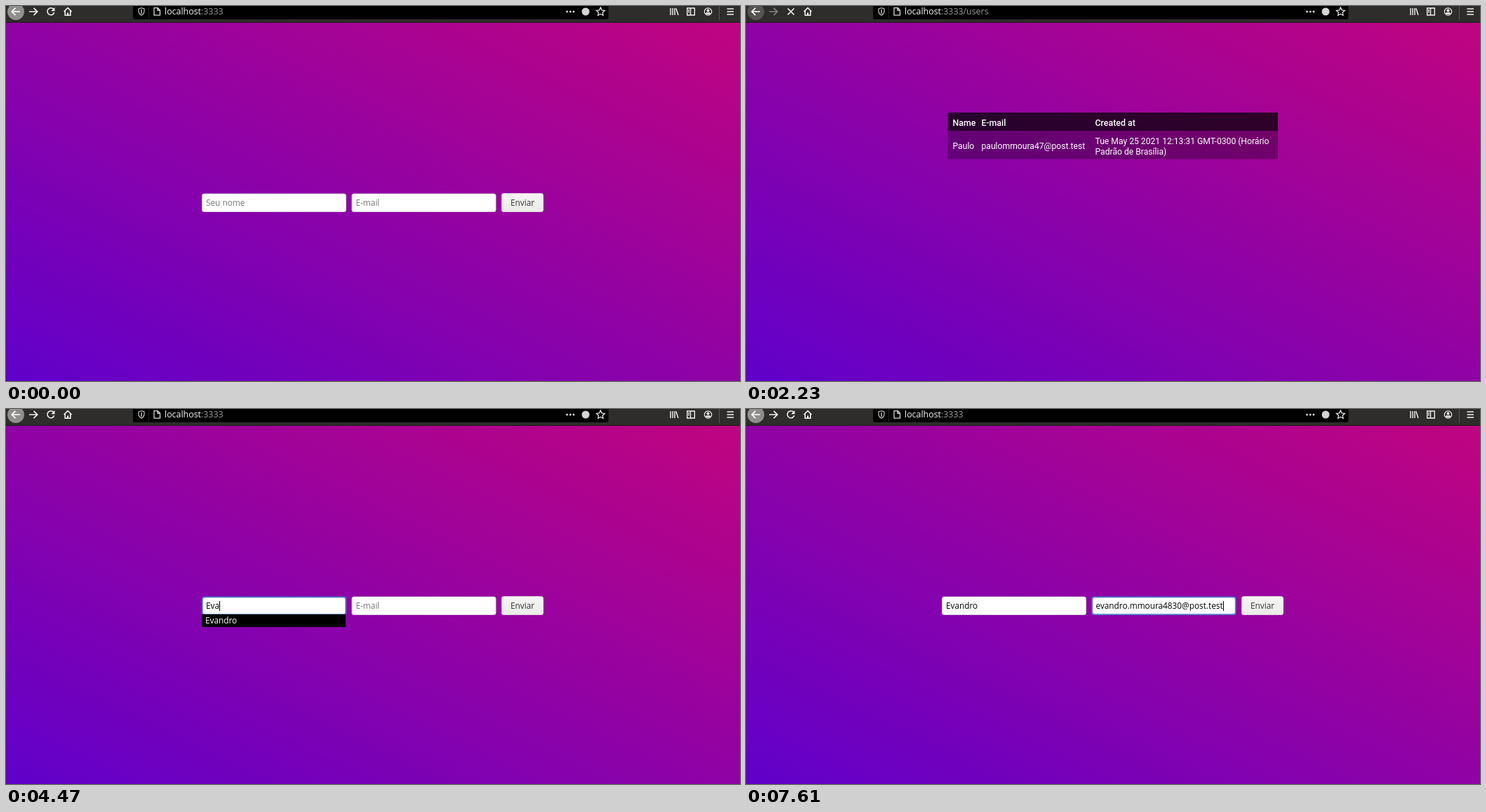
Recreate the animation shown at these times as an HTML page with a canvas. Size 1046 px wide and 535 px high, loop 8000 ms.

```html
<!DOCTYPE html>
<html lang="pt-BR">
<head>
<meta charset="utf-8">
<title>Cadastro</title>
<style>
  html, body { margin: 0; width: 100%; height: 100%; overflow: hidden; background: #9000a4; }
  canvas { display: block; width: 1046px; height: 535px; }
</style>
</head>
<body>
<canvas id="stage" width="1046" height="535"></canvas>
<script>
const W = 1046, H = 535, BAR = 24, LOOP = 8000;
const ctx = document.getElementById('stage').getContext('2d');
const UI = '"Open Sans", "Noto Sans", sans-serif';
const FIELD = '11.8px ' + UI;
const ICON = '#f2f2f0';
const NAME = 'Evandro';
const MAIL = 'evandro.mmoura4830@post.test';

// Value of the last [time, value] step reached.
const at = (t, steps) => steps.reduce((v, s) => t >= s[0] ? s[1] : v, steps[0][1]);
const within = (t, a, b) => t >= a && t < b;

function text(str, x, y, font, color) {
  ctx.font = font;
  ctx.fillStyle = color;
  ctx.fillText(str, x, y);
  return x + ctx.measureText(str).width;
}

function rect(x, y, w, h, color) {
  ctx.fillStyle = color;
  ctx.fillRect(x, y, w, h);
}

function round(x, y, w, h, r, fill) {
  ctx.beginPath();
  ctx.roundRect(x, y, w, h, r);
  ctx.fillStyle = fill;
  ctx.fill();
}

function disc(x, y, r, color) {
  ctx.beginPath();
  ctx.arc(x, y, r, 0, Math.PI * 2);
  ctx.fillStyle = color;
  ctx.fill();
}

function path(d, color = ICON, width = 1.5) {
  ctx.strokeStyle = color;
  ctx.lineWidth = width;
  ctx.stroke(new Path2D(d));
}

function background() {
  const h = H - BAR, k = W * h / (W * W + h * h);
  const cx = W / 2, cy = BAR + h / 2;
  const g = ctx.createLinearGradient(cx - h * k, cy + W * k, cx + h * k, cy - W * k);
  g.addColorStop(0, '#6000ca');
  g.addColorStop(1, '#c00480');
  rect(0, BAR, W, h, g);
}

function star(x, y, r) {
  let d = '';
  for (let i = 0; i < 10; i++) {
    const a = i * Math.PI / 5 - Math.PI / 2, q = i % 2 ? r * 0.48 : r;
    d += (i ? 'L' : 'M') + (x + q * Math.cos(a)) + ' ' + (y + q * Math.sin(a));
  }
  path(d + 'Z', ICON, 1.2);
}

function toolbar(t) {
  rect(0, 0, W, BAR, '#2e2d2b');
  rect(0, BAR - 1, W, 1, '#1d1b1c');

  disc(14, 8, 12, within(t, 2230, 2430) ? '#555452' : '#908f8d');
  path('M20 8H8.5M13.5 2.8L8.3 8L13.5 13.2', '#fff', 1.7);

  const hover = at(t, [[0, 0], [500, 0.12], [610, 0.25], [1020, 0]]);
  if (hover) disc(39, 8, 12, `rgba(255,255,255,${hover})`);
  path('M33 8H44.5M39.5 2.8L44.7 8L39.5 13.2', within(t, 1020, 2360) ? '#858482' : ICON, 1.7);

  if (within(t, 610, 1020) || within(t, 2230, 2330)) {
    path('M59.5 3.5L68.5 12.5M68.5 3.5L59.5 12.5', ICON, 1.7);
  } else {
    path('M67.8 4.6A5 5 0 1 0 68.7 9.3', ICON, 1.6);
    ctx.fillStyle = ICON;
    ctx.fill(new Path2D('M69.5 2V7.2H64.3Z'));
  }
  path('M82.5 8L88 2.6L93.5 8M84.2 7V13.2H91.8V7', ICON, 1.6);
  path('M88 13V9.5', ICON, 2.2);

  round(181, -6, 677.5, 25, 3, '#000');
  path('M193 2.8L197 4V7C197 10 195.3 12 193 13.2C190.7 12 189 10 189 7V4Z', '#c9c9c9', 1.2);
  path('M193 5V11', '#c9c9c9', 1.4);
  path('M203.5 0V18', '#252525', 1);
  path('M211 2.7H216.3L219.5 6V13.2H211ZM216 3V6.3H219.3', '#d5d5d5', 1.3);

  const users = within(t, 850, 2360);
  const x = text('localhost', 226, 12, '12.4px ' + UI, '#f9f9fa');
  text(users ? ':3333/users' : ':3333', x, 12, '12.4px ' + UI, '#9b9b9d');

  for (let i = 0; i < 3; i++) disc(799.5 + i * 4.7, 8, 1.5, '#d5d5d5');
  disc(826, 8, 5.5, '#d5d5d5');
  star(847.3, 8.3, 6.3);

  path('M947 3V13M950 3V13M953 3V13M954.8 3.2L958 13', ICON, 1.4);
  path('M970.7 3H981.3V13H970.7ZM975.5 3V13M972 6H974M972 8.5H974', ICON, 1.4);
  path('M995.3 8A5.2 5.2 0 1 1 1005.7 8A5.2 5.2 0 1 1 995.3 8Z', ICON, 1.2);
  disc(1000.5, 6.6, 2, ICON);
  round(997.2, 9.2, 6.6, 2.6, 1.3, ICON);
  path('M1016.5 0V20', '#5a5957', 1);
  path('M1027.5 4H1037M1027.5 8H1037M1027.5 12H1037', ICON, 1.6);
}

function field(x, value, hint, focused, caret) {
  round(x, 267.5, 206, 26.5, 3.5, focused ? '#4a80cc' : '#c9c0cc');
  const b = focused ? 1.7 : 0.8;
  round(x + b, 267.5 + b, 206 - 2 * b, 26.5 - 2 * b, 2.5, '#fff');
  const end = text(value, x + 6, 285, FIELD, '#000');
  if (!value) text(hint, x + 6, 285, FIELD, '#757575');
  if (focused && caret) rect(Math.round(end), 274, 1, 14, '#000');
}

function popup(x, rows, picked) {
  rect(x, 293, 205, 2 + rows.length * 16, '#000');
  if (picked) rect(x + 1, 294, 203, 16, '#15539e');
  rows.forEach((row, i) => text(row, x + 5, 306 + i * 16, FIELD, '#fff'));
}

function form(t) {
  const letters = at(t, [[0, 0], [4090, 1], [4300, 2], [4470, 3], [4540, 4],
    [4740, 5], [4950, 6], [5090, 7]]);
  const mailLetters = at(t, [[0, 0], [6640, 1], [6920, 2], [7610, MAIL.length]]);
  const nameFocus = within(t, 3020, 5710);
  const mailFocus = within(t, 880, 3020) || t >= 5710;

  field(279, NAME.slice(0, letters), 'Seu nome', nameFocus, t < 5430);
  field(492.5, MAIL.slice(0, mailLetters), 'E-mail', mailFocus, true);

  const g = ctx.createLinearGradient(0, 267, 0, 294);
  g.addColorStop(0, '#f6f5f4');
  g.addColorStop(1, '#ebebe8');
  round(706, 267, 60, 27, 3.5, '#d3ccd2');
  round(706.7, 267.7, 58.6, 25.6, 3, g);
  text('Enviar', 719, 285, FIELD, '#2e3436');

  if (within(t, 4190, 5710)) popup(279, t < 4470 ? [NAME, 'Elisa', 'Ester'] : [NAME]);
  if (within(t, 6810, 7610)) popup(492, [MAIL], t >= 7190);
}

function table() {
  const head = '500 12.4px Roboto, sans-serif', cell = '12.15px Roboto, sans-serif';
  rect(287.5, 152, 470.5, 26, 'rgba(0,0,0,.72)');
  rect(287.5, 178, 470.5, 40.5, 'rgba(0,0,0,.3)');
  text('Name', 294.5, 171, head, '#fff');
  text('E-mail', 335.5, 171, head, '#fff');
  text('Created at', 497.5, 171, head, '#fff');
  text('Paulo', 294.5, 204, cell, '#fff');
  text('paulommoura47@post.test', 335.5, 204, cell, '#fff');
  text('Tue May 25 2021 12:13:31 GMT-0300 (Horário', 497.5, 197, cell, '#fff');
  text('Padrão de Brasília)', 497.5, 212, cell, '#fff');
}

function draw(now) {
  const t = now % LOOP;
  background();
  toolbar(t);
  if (within(t, 1020, 2330)) table();
  else form(t);
}

const start = performance.now();
function tick() {
  draw(performance.now() - start);
  requestAnimationFrame(tick);
}
tick();
</script>
</body>
</html>
```
